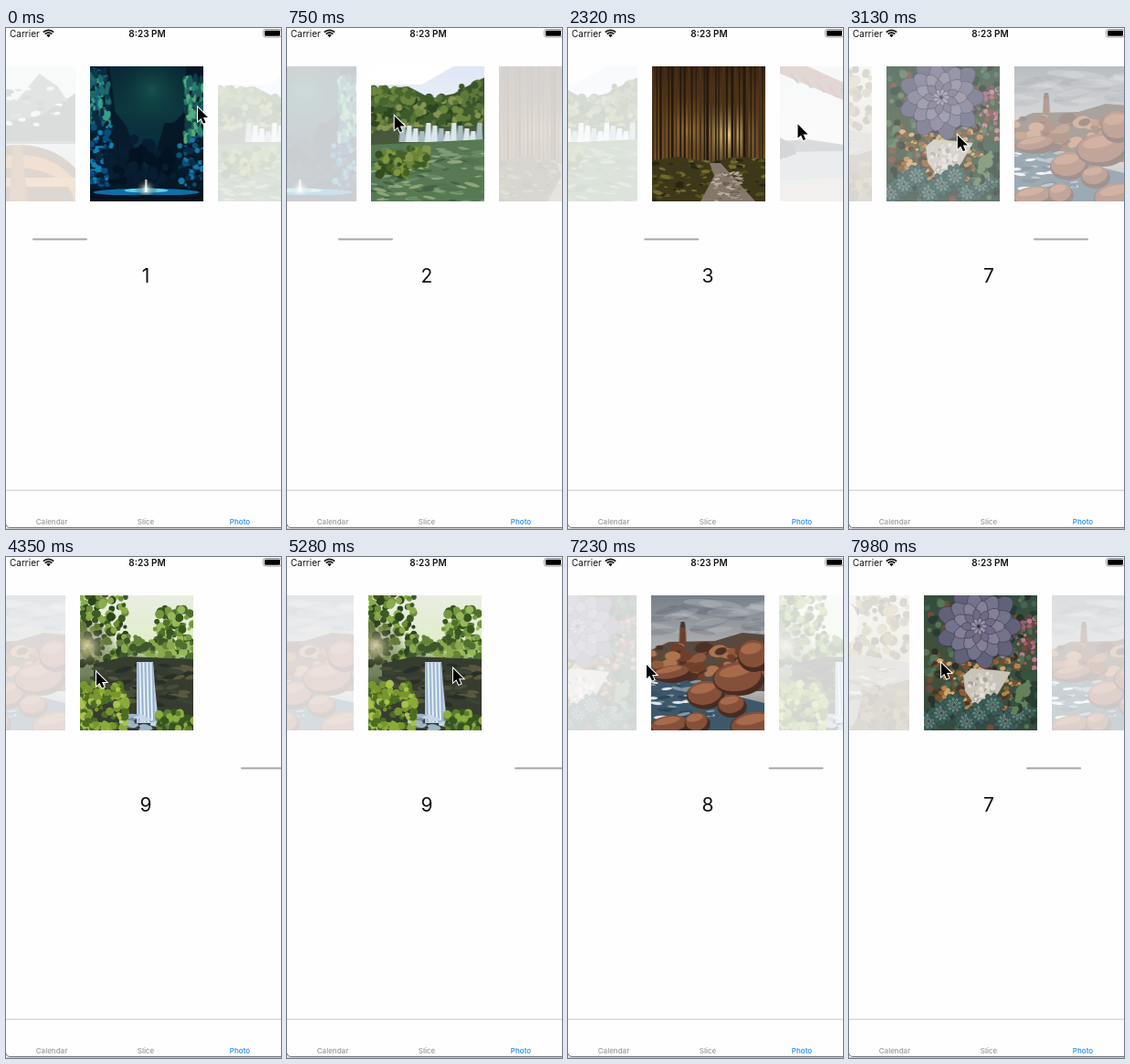
An HTML page with a canvas that plays this animation: 301x549 px, repeating every 8 s.

```html
<!DOCTYPE html>
<html lang="en">
<head>
<meta charset="utf-8">
<title>Photo carousel</title>
<style>
  html, body { margin: 0; width: 100%; height: 100%; overflow: hidden; background: #fefefe; }
  body { position: relative; font-family: Inter, Roboto, sans-serif; color: #111; }
  canvas, svg { position: absolute; left: 0; top: 0; }
  span { position: absolute; white-space: nowrap; line-height: 12px; font-size: 10px; }
  .mid { transform: translateX(-50%); }
  .tab { top: 535px; font-size: 8px; font-weight: 500; color: #999; }
  #count { left: 153px; top: 260px; font-size: 21px; line-height: 24px; }
</style>
</head>
<body>
<span style="left:4px;top:0">Carrier</span>
<span class="mid" style="left:154.5px;top:0;font-weight:600">8:23 PM</span>
<span class="mid" id="count">1</span>
<span class="mid tab" style="left:50px">Calendar</span>
<span class="mid tab" style="left:153px">Slice</span>
<span class="mid tab" style="left:256px;color:#1b8af5">Photo</span>
<svg width="301" height="549" fill="none">
  <path d="M40.800 4.700a8 8 0 0 1 11.400 0M42.700 6.700a5.300 5.300 0 0 1 7.600 0" stroke="#111" stroke-width="1.700"/>
  <path d="M44.300 8a3 3 0 0 1 4.400 0L46.500 10.200Z" fill="#111"/>
  <rect x="281.500" y="1.500" width="20" height="8.500" rx="2.500" stroke="#999"/>
  <rect x="283" y="2.800" width="17" height="6" rx="1.300" fill="#000"/>
  <path d="M0 506.500H301" stroke="#cfcfcf"/>
  <path d="M0 544q.5 3.500 4 3.500H301" stroke="#777"/>
  <path d="M0 548.500H301" stroke="#d0d0d0"/>
</svg>
<canvas id="stage" width="301" height="549"></canvas>
<script>
const LOOP = 8000, STEP = 140, W = 124, H = 148, HOME = 91.5, TOP = 42, LAST = 9;
const ctx = document.getElementById('stage').getContext('2d');
const count = document.getElementById('count');
let g, seed;

// ---- painting helpers (g is the card being painted) ----
const random = () => (seed = (seed * 16807) % 2147483647) / 2147483647;
const between = (a, b) => a + (b - a) * random();

function sky(...colors) {
  const fill = g.createLinearGradient(0, 0, 0, H);
  colors.forEach((c, i) => fill.addColorStop(i / (colors.length - 1), c));
  g.fillStyle = fill;
  g.fillRect(0, 0, W, H);
}
function poly(color, ...p) {
  g.fillStyle = color;
  g.beginPath();
  for (let i = 0; i < p.length; i += 2) g.lineTo(p[i], p[i + 1]);
  g.fill();
}
function oval(color, x, y, rx, ry = rx, turn = 0) {
  g.fillStyle = color;
  g.beginPath();
  g.ellipse(x, y, rx, ry, turn, 0, 7);
  g.fill();
}
function glow(color, x, y, r) {
  const fill = g.createRadialGradient(x, y, 0, x, y, r);
  fill.addColorStop(0, color);
  fill.addColorStop(1, 'transparent');
  g.fillStyle = fill;
  g.fillRect(0, 0, W, H);
}
// n small marks scattered over a box
function scatter(n, x, y, w, h, colors, rx, ry = rx) {
  const list = colors.split(' ');
  for (let i = 0; i < n; i++) {
    const k = between(.4, 1);
    oval(list[i % list.length], x + random() * w, y + random() * h, rx * k, ry * k, between(-.3, .3));
  }
}
function rosette(x, y, r, colors) {
  colors.forEach((c, ring) => {
    const size = r * (1 - ring / colors.length);
    for (let i = 0; i < 9; i++) {
      const a = i * .698 + ring * .35;
      g.strokeStyle = '#39374a';
      g.lineWidth = .6;
      oval(c, x + Math.cos(a) * size * .6, y + Math.sin(a) * size * .6, size * .42, size * .24, a);
      g.stroke();
    }
  });
}

const scenes = [
  () => { // boat on a mountain lake
    sky('#e8eced', '#cfd8da', '#9eabad');
    poly('#717c79', 0, 20, 25, 5, 60, 38, 85, 8, 105, 22, 124, 50, 124, 85, 0, 85);
    poly('#4f5c55', 0, 50, 40, 62, 85, 55, 124, 30, 124, 82, 0, 82);
    scatter(35, 0, 20, W, 45, '#dde2e2 #89938f #56645b', 6, 3);
    oval('#613d20', 62, 142, 74, 56);
    oval('#bd7133', 62, 147, 68, 50);
    oval('#623a1e', 62, 153, 62, 42);
    poly('#c8813d', 0, 122, W, 122, W, 132, 0, 132);
    poly('#8d5427', 56, 86, 66, 86, 72, H, 52, H);
  },
  () => { // night canyon
    sky('#0a2a3d', '#0c3c47', '#0a2a3d', '#051725');
    glow('rgba(30,105,85,.55)', 68, 25, 60);
    poly('#071b2c', 0, 0, 22, 0, 28, 50, 40, 65, 50, 92, 60, 112, 62, H, 0, H);
    poly('#061726', W, 0, 106, 0, 102, 52, 92, 62, 82, 62, 74, 90, 64, 112, 62, H, W, H);
    scatter(110, 0, 5, 22, 60, '#1c6b69 #0c3b4c #39a08b #0a2b42 #195e7c', 3, 6);
    scatter(90, 0, 60, 25, 70, '#0a4d7c #1180b6 #082842 #061d30', 4, 4);
    scatter(90, 104, 12, 20, 68, '#2a8170 #56ad7d #123d47 #1c5d62', 3, 7);
    scatter(70, 98, 78, 26, 55, '#0b5078 #092d48 #061b2c #137aa5', 4);
    scatter(40, 22, 80, 75, 48, '#041322 #071e32', 8, 9);
    poly('#06131f', 0, 134, W, 134, W, H, 0, H);
    oval('#0e6fa8', 62, 138, 58, 4);
    oval('#58d3f0', 62, 136, 24, 2.5);
    glow('#e8ffff', 62, 135, 13);
    poly('#06131f', 0, 141, W, 141, W, H, 0, H);
    poly('#fff', 61, 124, 62.5, 124, 63, 138, 60.500, 138);
  },
  () => { // green lake with waterfalls
    sky('#dfe7f5', '#f3f6fb', '#dfe8df');
    poly('#fff', 0, 0, 90, 0, 55, 20, 0, 20);
    poly('#405b2d', 0, 32, 15, 25, 40, 22, 65, 35, 90, 30, 112, 18, W, 12, W, 85, 0, 85);
    scatter(240, -2, 34, 128, 38, '#2d4520 #55713a #6d873f #3d5a2a #879551', 5);
    scatter(45, 0, 24, 48, 15, '#49662e #6a853d', 5);
    scatter(35, 98, 18, 26, 25, '#3a5529 #5d783a', 5);
    poly('#48583c', 0, 75, 30, 67, W, 65, W, 95, 0, 95);
    for (let i = 0; i < 13; i++) poly(i % 3 ? '#dce7ed' : '#a9bdc3', 32 + i * 7, 62 + i % 4 * 3, 37 + i * 7, 62 + i % 4 * 3, 38 + i * 7, 83, 30 + i * 7, 83);
    poly('#577954', 0, 86, W, 80, W, H, 0, H);
    scatter(130, 0, 90, W, 58, '#678963 #436344 #7e9d74 #527451 #91a67a', 9, 2);
    scatter(80, 8, 94, 32, 25, '#446126 #678238 #809744 #324d20', 5);
    scatter(55, 41, 90, 21, 20, '#3f5c25 #6b8639 #82964a', 5);
  },
  () => { // sunlit forest track
    sky('#3a2412', '#5f3f1c', '#77562c', '#342814');
    glow('rgba(255,222,135,.95)', 83, 75, 48);
    glow('rgba(220,160,70,.5)', 40, 70, 50);
    for (let i = 0; i < 30; i++) {
      const x = i * 4.3 + between(-1, 1), w = between(1, 3.4);
      poly(i % 3 ? '#25190e' : '#493019', x, 0, x + w, 0, x + w, 103, x, 106);
    }
    poly('#3d3819', 0, 103, 30, 99, 62, 106, 90, 99, W, 101, W, H, 0, H);
    scatter(130, 0, 101, W, 45, '#555021 #2a2612 #726b2e #3c371c', 5, 2);
    poly('#85786a', 63, 106, 75, 106, 86, 118, 113, H, 53, H, 68, 120);
    scatter(65, 66, 116, 32, 32, '#a19484 #6b6056 #bbb0a0', 4, 1.500);
  },
  () => { // bridge over water
    sky('#dce0e4', '#ebecec', '#c8ccce');
    poly('#495057', 0, 82, 30, 80, 70, 86, W, 84, W, 93, 0, 95);
    poly('#9ca5aa', 0, 94, W, 92, W, 125, 0, 125);
    poly('#c1bbb0', 0, 125, W, 120, W, H, 0, H);
    poly('#7b3d2b', 0, 0, 30, 0, W, 42, W, 60, 0, 8);
    for (let x = 10; x < W; x += 14) poly('#452b26', x, 5 + x * .3, x + 3, 5 + x * .3, x + 12, 15 + x * .36, x + 9, 15 + x * .36);
    poly('#363b3d', 0, 78, 14, 85, 18, 96, 0, 102);
  },
  () => { // hills and pines
    sky('#c4d3de', '#e2e3da', '#687d73');
    poly('#7b8f93', 0, 58, 34, 28, 62, 55, 92, 24, W, 50, W, 95, 0, 95);
    poly('#52684a', 0, 78, 40, 65, 80, 82, W, 66, W, H, 0, H);
    scatter(150, 0, 74, W, 74, '#35502f #526d3b #758346 #2c4229', 5, 8);
  },
  () => { // river among autumn trees
    sky('#d9d8c8', '#b6ae89', '#735f3a');
    scatter(160, 0, 0, W, 68, '#514a28 #7c6b34 #353b20 #a08546', 6);
    oval('#ded9c7', 50, 30, 18, 25);
    poly('#918d79', 0, 80, 70, 65, W, 74, W, 112, 50, H, 0, H);
    scatter(50, 0, 76, 105, 40, '#d0c9b5 #6b6b59 #a9a28b', 10, 2);
    poly('#594a2c', 60, H, 80, 105, W, 92, W, H);
    scatter(60, 70, 100, 55, 48, '#41371f #806736 #60552e', 6);
  },
  () => { // succulent garden
    sky('#344d3d', '#44513a', '#344b40');
    scatter(220, 0, 0, W, H, '#263c32 #436450 #577456 #293027 #714b38', 5);
    scatter(100, 82, 22, 42, 60, '#9d5c70 #b97c8b #6c424e #516a56', 3);
    scatter(170, 12, 70, 98, 60, '#b78247 #d0a56a #79502e #8e6034 #493725', 4, 3);
    oval('#30313e', 60, 34, 37, 40);
    rosette(60, 34, 46, ['#61617a', '#74738c', '#858097', '#706b85', '#9992a7']);
    poly('#c9c4b9', 43, 88, 52, 80, 78, 82, 95, 84, 82, 106, 66, 130, 55, 119, 45, 105);
    scatter(55, 49, 85, 29, 32, '#e2ded4 #aaa49a #d5cfc5', 3);
    for (let i = 0; i < 9; i++) rosette(5 + i * 14, 138 - i % 3 * 9, 13, ['#365f56', '#5b8777', '#78a08b']);
    scatter(50, 96, 85, 28, 45, '#365341 #66805a #2a3d32', 6);
  },
  () => { // lighthouse on red rocks
    sky('#777f89', '#a8aaad', '#c6bfba', '#596871');
    scatter(32, 0, 5, W, 40, 'rgba(196,198,202,.3) rgba(90,98,110,.25)', 25, 5);
    poly('#59493d', 0, 60, 20, 51, 70, 50, 100, 41, W, 43, W, 105, 0, 105);
    poly('#69412f', 32, 34, 38, 34, 39, 53, 31, 53);
    poly('#46342d', 33, 29, 37, 29, 38, 35, 32, 35);
    poly('#3d586a', 0, 92, 50, 94, 100, 112, W, 118, W, H, 0, H);
    scatter(75, 0, 94, 95, 42, '#dfe5e8 #375365 #8197a3 #2c4659', 8, 2);
    scatter(75, 0, 56, W, 34, '#703f2a #925a3c #4d3025 #ad7450', 10, 6);
    for (const [x, y, rx, ry] of [[22, 85, 22, 9], [59, 108, 21, 15], [95, 90, 28, 18], [88, 120, 16, 12], [112, 65, 18, 17], [20, 142, 22, 11], [50, 139, 14, 12], [112, 142, 26, 15]]) {
      oval('#472c23', x + 1, y + 2, rx, ry);
      oval('#85503a', x, y - 1, rx - 2, ry - 2, -.15);
      oval('#a76b4c', x - 2, y - ry * .4, rx * .65, ry * .35, -.2);
    }
  },
  () => { // waterfall in green woods
    sky('#e8eee2', '#e2edcb', '#50633a', '#394932');
    scatter(150, 0, -2, 50, 80, '#3d5b23 #6c8d36 #8bab4d #2c431f', 5);
    scatter(120, 82, 12, 42, 62, '#75983f #4e702c #98b95a #38551f', 5);
    scatter(60, 40, 45, 60, 26, '#65833a #3d572a #8ca84f', 5);
    glow('rgba(238,225,190,.85)', 8, 55, 32);
    poly('#363c2f', 15, 75, 50, 67, W, 70, W, H, 15, H);
    scatter(70, 18, 76, 106, 48, '#494b3b #292f27 #59583e #3b4334', 10, 3);
    poly('#bccfe0', 62, 73, 80, 73, 82, 100, 86, 140, 62, 140);
    for (let i = 0; i < 9; i++) poly(i % 2 ? '#eaf3fa' : '#91afc9', 63 + i * 2, 74, 64 + i * 2, 74, 66 + i * 2, 139, 64 + i * 2, 139);
    scatter(50, 48, 132, 65, 15, '#9eb4c7 #c7d7e3 #738ca2', 8, 3);
    scatter(150, -4, 97, 55, 50, '#78962f #a8c24b #4d6d22 #8bab39', 5);
    scatter(50, 86, 128, 40, 20, '#5c7d2b #8cad41 #38551f', 5);
  }
];

const cards = scenes.map((paint, i) => {
  const card = document.createElement('canvas');
  card.width = W;
  card.height = H;
  g = card.getContext('2d');
  seed = 1234 + i * 777;
  paint();
  return card;
});

// ---- motion: [time, value, ...] ----
const scrollKeys = [
  [0, 140], [55, 140], [330, 255], [520, 275], [900, 280], [1400, 280], [1450, 281.5],
  [1660, 345], [1760, 390], [2000, 415], [2320, 419.5], [2480, 420], [2640, 560],
  [2950, 910], [3250, 1075], [3600, 1115], [3900, 1120], [4080, 1120], [4350, 1270.5],
  [4800, 1260], [5250, 1260], [5420, 1288], [5800, 1260], [5900, 1260], [5990, 1250.5],
  [6250, 1150], [6600, 1125], [7150, 1121.2], [7230, 1121], [7450, 1062], [7530, 1048],
  [7640, 1008], [7980, 989.5], [8000, 989.3]
];
const pointerKeys = [
  [0, 210, 87], [55, 210, 87], [330, 95, 95], [700, 110, 96], [1150, 250, 103], [1450, 254, 105],
  [1760, 140, 112], [1950, 110, 112], [2250, 250, 106], [2480, 253, 105], [2640, 110, 115],
  [2900, 100, 118], [3950, 252, 114], [4080, 252, 115], [4350, 99, 126], [5050, 99, 126],
  [5250, 190, 122], [5420, 98, 124], [5900, 98, 125], [5990, 109, 125], [6250, 225, 118],
  [6500, 225, 116], [7100, 90, 118], [7230, 86, 118], [7640, 200, 116], [7980, 101, 116], [8000, 100, 116]
];

// monotone cubic interpolation: smooth, never overshoots a key
function track(keys, t, c = 1) {
  let i = 0;
  while (i < keys.length - 2 && t >= keys[i + 1][0]) i++;
  const slope = k => k < 0 || k > keys.length - 2 ? 0 : (keys[k + 1][c] - keys[k][c]) / (keys[k + 1][0] - keys[k][0]);
  const tangent = k => {
    const a = slope(k - 1), b = slope(k);
    return a * b > 0 ? 2 * a * b / (a + b) : 0;
  };
  const span = keys[i + 1][0] - keys[i][0], u = (t - keys[i][0]) / span, v = 1 - u;
  return keys[i][c] * v * v * (1 + 2 * u) + keys[i + 1][c] * u * u * (3 - 2 * u)
    + span * u * v * (tangent(i) * v - tangent(i + 1) * u);
}

const arrow = new Path2D('M0 0V15L3.500 12L6 17.500L8.500 16.500L6 11H11Z');

function draw(t) {
  const scroll = track(scrollKeys, t);
  ctx.clearRect(0, 0, 301, 549);
  cards.forEach((card, i) => {
    const shift = i * STEP - scroll;
    if (Math.abs(shift) > 230) return;
    const away = Math.max(0, Math.abs(shift) - 10) / (STEP - 10);
    ctx.globalAlpha = 1 - .8 * Math.min(1, away);
    ctx.drawImage(card, HOME + shift, TOP);
  });
  ctx.globalAlpha = 1;

  // the scroll bar moves pixel for pixel past the end
  const end = LAST * STEP, bar = 1.8 + 27.2 * Math.min(scroll, end) / STEP + Math.max(0, scroll - end);
  ctx.fillStyle = '#a6a6a6';
  ctx.beginPath();
  ctx.roundRect(bar, 230.5, 60, 2, 1);
  ctx.fill();

  ctx.save();
  ctx.translate(track(pointerKeys, t, 1), track(pointerKeys, t, 2));
  ctx.strokeStyle = '#fff';
  ctx.lineWidth = 2;
  ctx.stroke(arrow);
  ctx.fillStyle = '#000';
  ctx.fill(arrow);
  ctx.restore();

  count.textContent = Math.min(LAST, Math.round(scroll / STEP));
}

const start = performance.now();
function tick() {
  draw((performance.now() - start) % LOOP);
  requestAnimationFrame(tick);
}
tick();
</script>
</body>
</html>
```
